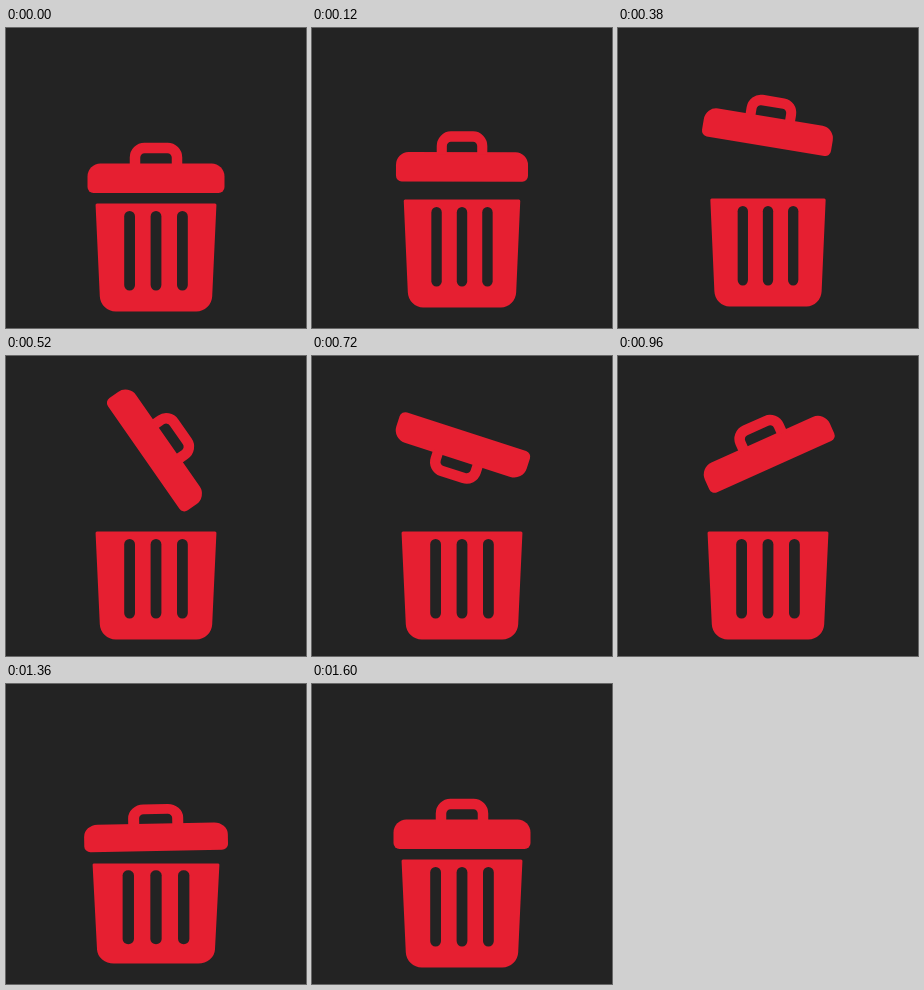
An HTML page with a canvas for the animation above (2120 ms loop, 300 by 300 pixels).

```html
<!DOCTYPE html>
<html lang="en">
<head>
<meta charset="utf-8">
<title>Trash bin</title>
<style>
  html, body { margin: 0; width: 100%; height: 100%; overflow: hidden; background: #232323; }
  canvas { display: block; width: 300px; height: 300px; }
</style>
</head>
<body>
<canvas id="stage" width="300" height="300"></canvas>
<script>
const ctx = document.getElementById('stage').getContext('2d');
const BG = '#232323', RED = '#e61f31';
const LOOP = 2120, MOVE = 1600, STEP = 20;

// [time, height above rest]
const LIFT = [[0, 0], [260, 33], [520, 57], [720, 60], [960, 53], [1100, 41], [1360, -3], [1600, 0]];
// [time, log-odds of the completed share of one turn]
const TURN = [[0, -10], [260, -5.5], [520, -1.71], [720, 0.2], [960, 2.63], [1360, 5.8], [1600, 8.5]];

// Monotone cubic interpolation
function curve(keys, t) {
  const slope = i => (keys[i + 1][1] - keys[i][1]) / (keys[i + 1][0] - keys[i][0]);
  const tangent = i => {
    if (i === 0 || i === keys.length - 1) return 0;
    const a = slope(i - 1), b = slope(i);
    return a * b <= 0 ? 0 : 2 * a * b / (a + b);
  };
  let i = 0;
  while (i < keys.length - 2 && t > keys[i + 1][0]) i++;
  const [t0, v0] = keys[i], [t1, v1] = keys[i + 1];
  const d = t1 - t0, u = (t - t0) / d, w = 1 - u;
  return v0 * (1 + 2 * u) * w * w + v1 * u * u * (3 - 2 * u)
    + d * (tangent(i) * u * w * w - tangent(i + 1) * u * u * w);
}

// Smooth rise and fall, 520 ms long
function hump(t, start) {
  const u = (t - start) / 520;
  return u > 0 && u < 1 ? Math.sin(Math.PI * u) ** 2 : 0;
}

function at(x, y, angle, sx, sy, draw) {
  ctx.save();
  ctx.translate(x, y);
  ctx.rotate(angle);
  ctx.scale(sx, sy);
  draw();
  ctx.restore();
}

function drawLid() {
  ctx.fillStyle = ctx.strokeStyle = RED;
  ctx.beginPath();
  ctx.roundRect(-68.5, -14.5, 137, 29.5, [13, 13, 6, 6]);
  ctx.fill();
  ctx.lineWidth = 10.5;
  ctx.beginPath();
  ctx.moveTo(-21, -12);
  ctx.arcTo(-21, -30, 0, -30, 9.5);
  ctx.arcTo(21, -30, 21, -12, 9.5);
  ctx.lineTo(21, -12);
  ctx.stroke();
}

function drawBin() {
  ctx.fillStyle = RED;
  ctx.beginPath();
  ctx.moveTo(0, -54);
  ctx.arcTo(60.5, -54, 55.5, 54, 1.5);
  ctx.arcTo(55.5, 54, 0, 54, 16);
  ctx.arcTo(-55.5, 54, -60.5, -54, 16);
  ctx.arcTo(-60.5, -54, 0, -54, 1.5);
  ctx.fill();
  ctx.fillStyle = BG;
  for (const x of [-26.4, 0, 26.4]) {
    ctx.beginPath();
    ctx.roundRect(x - 5.4, -46.5, 10.8, 79.5, 5.4);
    ctx.fill();
  }
}

function render(now) {
  const t = Math.min(MOVE, Math.floor((now % LOOP) / STEP) * STEP);
  const hop = hump(t, 0), squash = hump(t, 1080);
  const sx = 1 - 0.082 * hop + 0.05 * squash;
  const sy = 1 - 0.073 * squash;
  const moving = t > 0 && t < MOVE;
  const angle = moving ? 2 * Math.PI / (1 + Math.exp(-curve(TURN, t))) : 0;

  ctx.fillStyle = BG;
  ctx.fillRect(0, 0, 300, 300);
  at(150, 229.5 - 9 * hop, 0, sx, sy, drawBin);
  at(150, 150 - curve(LIFT, t), angle, sx, sy, drawLid);
}

const start = performance.now();
function tick() {
  render(performance.now() - start);
  requestAnimationFrame(tick);
}
tick();
</script>
</body>
</html>
```
